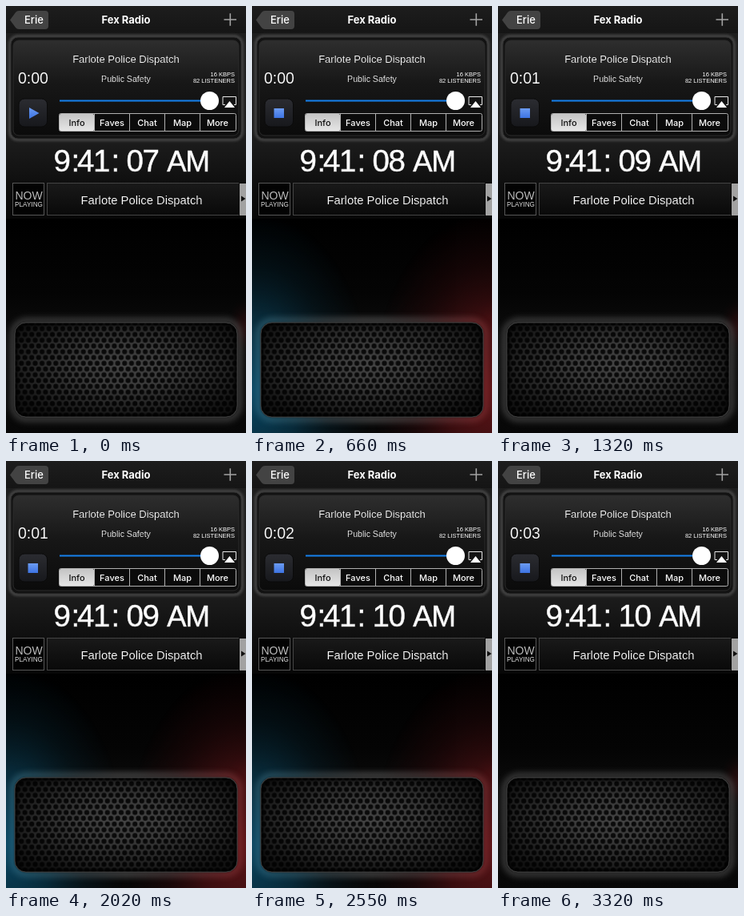
Recreate the animation shown at these times as an HTML page. Size 300x534 px, loop 3.35 s.

```html
<!DOCTYPE html>
<html lang="en">
<head>
<meta charset="utf-8">
<title>Radio player</title>
<style>
html, body { margin: 0; width: 100%; height: 100%; overflow: hidden; background: #000; }
svg { display: block; width: 100%; height: 100%; }
text { fill: #fff; font-family: "Liberation Sans", Arial, sans-serif; }
.light { stroke: #111; stroke-width: .12px; }
.ui { font-family: Inter, "Liberation Sans", sans-serif; }
.clock { font: 38.5px Lato, "Open Sans", sans-serif; letter-spacing: -1.5px; fill: url(#metal); stroke: url(#metal); stroke-width: .5px; }
.mid { text-anchor: middle; }
.end { text-anchor: end; }
</style>
</head>
<body>
<svg viewBox="0 0 300 534">
  <defs>
    <linearGradient id="page" x2="0" y2="1"><stop stop-color="#1e1e1e"/><stop offset=".58" stop-color="#1c1c1c"/><stop offset=".82" stop-color="#0e0e0e"/><stop offset="1" stop-color="#070707"/></linearGradient>
    <linearGradient id="bar" x2="0" y2="1"><stop stop-color="#1d1d1d"/><stop offset="1" stop-color="#151515"/></linearGradient>
    <linearGradient id="panel" x2="0" y2="1"><stop stop-color="#2e2e2e"/><stop offset=".45" stop-color="#171717"/><stop offset="1" stop-color="#0b0b0b"/></linearGradient>
    <linearGradient id="key" x2="0" y2="1"><stop stop-color="#2b2c31"/><stop offset="1" stop-color="#17181c"/></linearGradient>
    <linearGradient id="blue" x2="0" y2="1"><stop stop-color="#6c9cf2"/><stop offset="1" stop-color="#3d73e2"/></linearGradient>
    <linearGradient id="chosen" x2="0" y2="1"><stop stop-color="#c4c4c4"/><stop offset="1" stop-color="#e6e6e6"/></linearGradient>
    <linearGradient id="metal" gradientUnits="userSpaceOnUse" x1="0" y1="180" x2="0" y2="208"><stop stop-color="#fff"/><stop offset=".6" stop-color="#f6f6f6"/><stop offset="1" stop-color="#b4b4b4"/></linearGradient>
    <linearGradient id="row" x2="0" y2="1"><stop stop-color="#191919"/><stop offset="1" stop-color="#090909"/></linearGradient>
    <linearGradient id="floor" x2="0" y2="1"><stop stop-color="#000"/><stop offset=".35" stop-color="#040404"/><stop offset=".6" stop-color="#0e0e0e"/><stop offset="1" stop-color="#070707"/></linearGradient>
    <radialGradient id="shade" cy=".45" r=".62"><stop stop-color="#000" stop-opacity="0"/><stop offset=".35" stop-color="#000" stop-opacity=".15"/><stop offset="1" stop-color="#000" stop-opacity=".75"/></radialGradient>
    <radialGradient id="cool"><stop stop-color="#0b5273"/><stop offset=".4" stop-color="#093f57" stop-opacity=".75"/><stop offset=".7" stop-color="#062735" stop-opacity=".4"/><stop offset="1" stop-color="#04202e" stop-opacity="0"/></radialGradient>
    <radialGradient id="warm"><stop stop-color="#6b171b"/><stop offset=".4" stop-color="#571114" stop-opacity=".75"/><stop offset=".7" stop-color="#360a0c" stop-opacity=".4"/><stop offset="1" stop-color="#2c0506" stop-opacity="0"/></radialGradient>
    <linearGradient id="rim"><stop stop-color="#3c8299"/><stop offset=".3" stop-color="#555"/><stop offset=".7" stop-color="#555"/><stop offset="1" stop-color="#a8393c"/></linearGradient>
    <pattern id="mesh" x="15" y="400" width="8.6" height="14.4" patternUnits="userSpaceOnUse">
      <rect width="8.6" height="14.4" fill="#444"/>
      <g fill="#0b0b0b" id="holes"></g>
    </pattern>
    <filter id="soft" x="-20%" y="-30%" width="140%" height="160%"><feGaussianBlur stdDeviation="4"/></filter>
    <filter id="fine" x="-10%" y="-10%" width="120%" height="120%"><feGaussianBlur stdDeviation="1.5"/></filter>
    <clipPath id="lower"><rect y="266" width="300" height="268"/></clipPath>
  </defs>

  <rect y="34" width="300" height="232" fill="url(#page)"/>

  <!-- title bar -->
  <rect width="300" height="34" fill="url(#bar)"/>
  <path d="M5 17.5 12 8Q13.5 6 16 6H49Q53 6 53 10V25Q53 29 49 29H16Q13.5 29 12 27Z" fill="#434343"/>
  <text class="ui" x="23" y="22" font-size="13" font-weight="500">Erie</text>
  <text class="ui mid" x="150" y="21.5" font-size="13" font-weight="700">Fex Radio</text>
  <path d="M272.5 17H288M280.3 9.3V24.7" stroke="#a2a2a2" stroke-width="1.6"/>

  <!-- player panel -->
  <rect x="5" y="38" width="290" height="129" rx="10" fill="none" stroke="#444" stroke-width="4" filter="url(#fine)"/>
  <rect x="6" y="39" width="288" height="127" rx="9" fill="#121212" stroke="#333"/>
  <rect x="9" y="43" width="282" height="119" rx="7" fill="url(#panel)" stroke="#2b2b2b"/>
  <text class="light mid" x="150" y="71" font-size="13">Farlote Police Dispatch</text>
  <text class="light" id="elapsed" x="15" y="97" font-size="19.5"></text>
  <text class="light mid" x="150" y="95" font-size="10.6">Public Safety</text>
  <text class="end" x="286" y="88" font-size="7.5">16 KBPS</text>
  <text class="end" x="286" y="96" font-size="7.5">82 LISTENERS</text>
  <rect x="16" y="116" width="35.5" height="35" rx="7" fill="url(#key)" stroke="#0a0a0a"/>
  <path id="play" d="M29 127 41.5 134 29 141Z" fill="url(#blue)"/>
  <rect id="stop" x="27.5" y="128" width="12.5" height="12" fill="url(#blue)"/>
  <path d="M67 118.5H250" stroke="#1681ee" stroke-width="2"/>
  <circle cx="254.5" cy="118.500" r="11.5" fill="#fff"/>
  <path d="M274 123.5H271V113.5H287.5V123.5H285" fill="none" stroke="#e8e8e8"/>
  <path d="M279.5 119 286 127H273Z" fill="#fff"/>
  <rect x="66.5" y="134.5" width="221" height="22" rx="2" fill="#0b0b0b" stroke="#b0b0b0"/>
  <rect x="67" y="135" width="43" height="21" rx="1.5" fill="url(#chosen)"/>
  <g id="tabs"></g>

  <!-- clock -->
  <g class="clock">
    <text x="59.5" y="207">9</text>
    <text class="mid" x="86" y="207">:</text>
    <text x="89" y="207">41</text>
    <text class="mid" x="136" y="207">:</text>
    <text id="time" x="150.5" y="207"></text>
    <text x="201" y="207" font-size="37">AM</text>
  </g>

  <!-- now playing -->
  <rect x="8.5" y="221.5" width="39" height="40" fill="#030303" stroke="#565656"/>
  <text class="mid" x="28.5" y="242" font-size="14" style="fill:#bbb">NOW</text>
  <text class="mid" x="28.5" y="251" font-size="8.2" style="fill:#ddd">PLAYING</text>
  <rect x="51" y="222" width="240" height="40" fill="url(#row)"/>
  <path d="M51 221.500H291M51 261.5H291M51.5 222V262" stroke="#444"/>
  <text class="light mid" x="169.5" y="248" font-size="14.8">Farlote Police Dispatch</text>
  <rect x="292" y="222" width="8" height="40" fill="#a2a2a2"/>
  <path d="M294 237.5 299.5 241 294 244.5Z" fill="#111"/>

  <!-- lights and speaker -->
  <g clip-path="url(#lower)">
    <rect y="266" width="300" height="268" fill="url(#floor)"/>
    <ellipse cx="300" cy="400" rx="22" ry="35" fill="url(#warm)" opacity=".3"/>
    <rect x="9" y="394" width="282" height="122" rx="17" fill="none" stroke="#777" stroke-width="6" opacity=".6" filter="url(#soft)"/>
    <g id="glow">
      <ellipse cy="480" rx="150" ry="225" fill="url(#cool)"/>
      <ellipse cx="300" cy="480" rx="150" ry="225" fill="url(#warm)"/>
    </g>
    <rect id="bloom" x="9" y="394" width="282" height="122" rx="17" fill="none" stroke="url(#rim)" stroke-width="6" filter="url(#soft)"/>
    <rect x="11" y="396" width="278" height="118" rx="14" fill="url(#mesh)"/>
    <rect x="11" y="396" width="278" height="118" rx="14" fill="url(#shade)" stroke="#6d6d6d" stroke-width="1"/>
    <rect x="13" y="398" width="274" height="114" rx="12" fill="none" stroke="#050505" stroke-width="3" filter="url(#fine)"/>
  </g>
</svg>
<script>
const LOOP = 3350;
const $ = id => document.getElementById(id);

// [start ms, value]: each value holds until the next start
const seconds = [[0, "07"], [130, "08"], [1120, "09"], [2120, "10"]];
const elapsed = [[0, "0:00"], [1320, "0:01"], [2320, "0:02"], [3320, "0:03"]];
const stopShown = [[0, 0], [260, .5], [390, 1]];
const light = [
  [0, 0], [590, .35], [630, .65], [660, .85], [690, .92], [790, 1], [890, 1], [990, .85], [1320, 0],
  [2020, .85], [2050, .92], [2120, 1], [2250, 1], [2350, .95], [2450, .9], [2550, .82], [3120, 0]
];

const at = (steps, t) => steps.findLast(([start]) => start <= t)[1];

const tabs = ["Info", "Faves", "Chat", "Map", "More"];
$("tabs").innerHTML = tabs.map((name, i) => {
  const x = 66.5 + i * 44;
  const divider = i ? `<path d="M${x} 135V156" stroke="#b0b0b0"/>` : "";
  return `${divider}<text class="ui mid" x="${x + 22}" y="149.5" font-size="11" font-weight="500"
    style="fill:${i ? "#fff" : "#111"}">${name}</text>`;
}).join("");

const hole = (x, y) => `<circle cx="${x}" cy="${y}" r="3.1"/>`;
$("holes").innerHTML = hole(4.3, 3.6) + hole(0, 10.8) + hole(8.6, 10.8);

function setText(id, value) {
  if ($(id).textContent !== value) $(id).textContent = value;
}

function draw(t) {
  const level = at(light, t);
  const stop = at(stopShown, t);
  setText("time", at(seconds, t));
  setText("elapsed", at(elapsed, t));
  $("play").setAttribute("opacity", 1 - stop);
  $("stop").setAttribute("opacity", stop);
  $("glow").setAttribute("opacity", level);
  $("bloom").setAttribute("opacity", Math.max(0, level - .6) * 1.7);
}

const begin = performance.now();
function tick() {
  draw((performance.now() - begin) % LOOP);
  requestAnimationFrame(tick);
}
tick();
</script>
</body>
</html>
```
